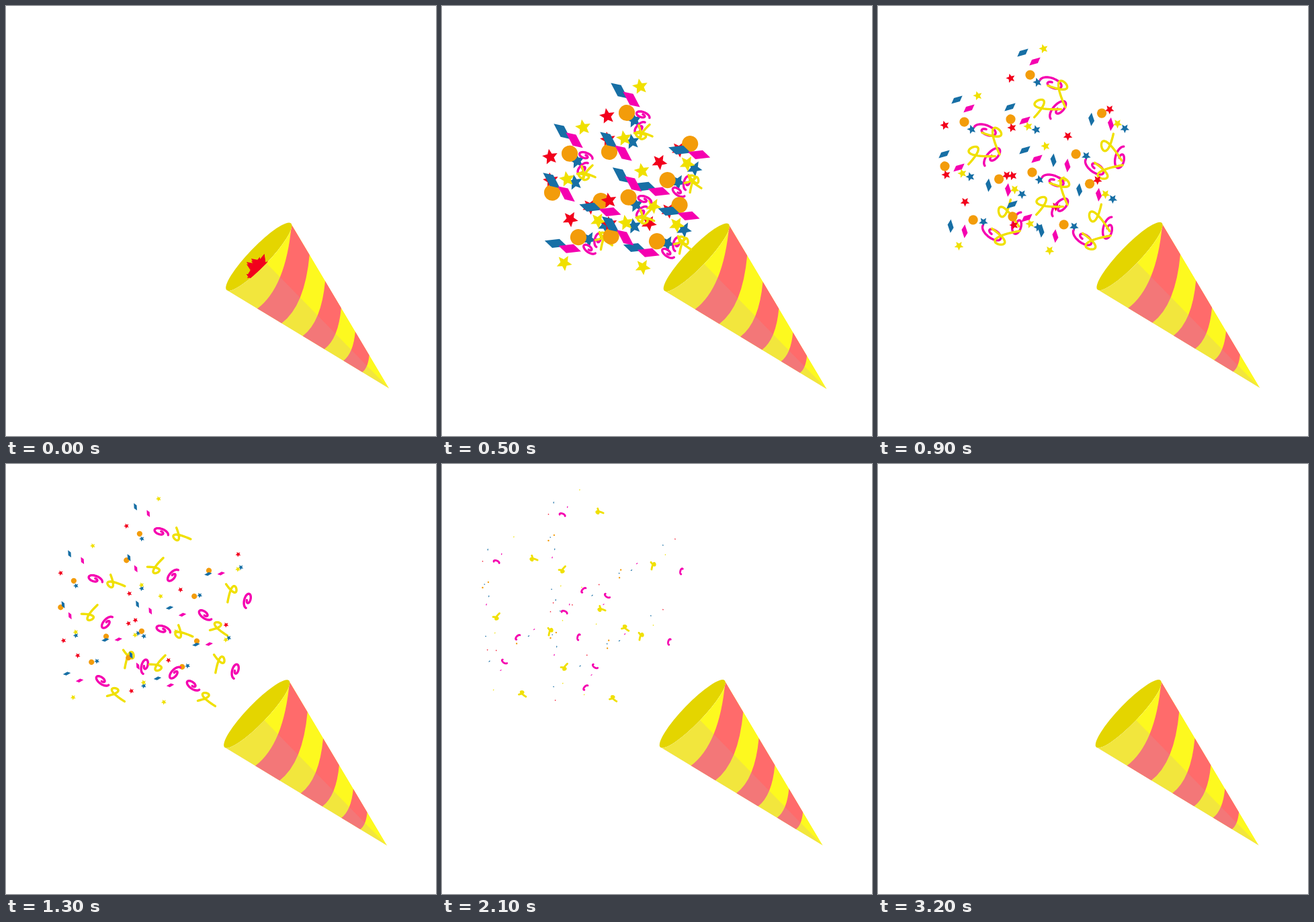
Animation of 640x640 px, one loop 3600 ms. Source, as an HTML page with a canvas:

```html
<!DOCTYPE html>
<html lang="en">
<head>
<meta charset="utf-8">
<title>Party popper</title>
<style>
html, body { margin: 0; width: 100%; height: 100%; overflow: hidden; background: #fff; }
canvas { display: block; width: 640px; height: 640px; }
</style>
</head>
<body>
<canvas id="stage" width="640" height="640"></canvas>
<script>
const ctx = document.getElementById('stage').getContext('2d');
const LOOP = 3600, STEP = 100, LAST = 3200, FADED = 3100;
const BURST = 500, SETTLED = 900;
const RED = '#f2001c', BLUE = '#176fa5', PINK = '#f500b0', ORANGE = '#f39c0a', YELLOW = '#f0e000';
const MUZZLE = [393, 408];
const RAD = Math.PI / 180;

const mix = (a, b, k) => a + (b - a) * k;
const clamp = v => Math.max(0, Math.min(1, v));
function track(t, times, vals) {
  const i = Math.max(1, times.findIndex(v => t <= v));
  if (t >= times[times.length - 1]) return vals[vals.length - 1];
  return mix(vals[i - 1], vals[i], (t - times[i - 1]) / (times[i] - times[i - 1]));
}

// Shot straight out of the cone, braked by the air, then drifting on.
const slowing = s => 1.934 * (1 - Math.exp(-s / 1100));
const steady = s => s / 800;
function place(p, t, ease, lead = 0) {
  const late = Math.max(t, BURST);
  const brake = Math.exp((BURST - late) / 85);
  const drift = ease(Math.max(0, late - SETTLED));
  const out = clamp(mix(lead, 1, t / BURST));
  return [0, 1].map(i => mix(MUZZLE[i], p.at[i] + p.kick[i] * brake + p.drift[i] * drift, out));
}

function star(r) {
  ctx.beginPath();
  for (let i = 0; i < 10; i++) {
    const a = (i * 36 - 142) * RAD, q = i % 2 ? r * 0.46 : r;
    ctx.lineTo(q * Math.cos(a), q * Math.sin(a));
  }
  ctx.fill();
}
function disc(r) {
  ctx.beginPath();
  ctx.arc(0, 0, r, 0, 2 * Math.PI);
  ctx.fill();
}
function diamond(r) {
  ctx.beginPath();
  ctx.moveTo(-1.42 * r, 0);
  ctx.lineTo(-0.3 * r, -0.64 * r);
  ctx.lineTo(1.42 * r, 0);
  ctx.lineTo(0.3 * r, 0.64 * r);
  ctx.fill();
}

function curve(from, to, point) {
  ctx.beginPath();
  for (let i = 0; i <= 40; i++) ctx.lineTo(...point(mix(from, to, i / 40)));
  ctx.stroke();
}
const flip = t => Math.cos(Math.PI * (t - SETTLED) / 400);
function curl(t, size) {
  const turns = 1.2 - 0.65 * clamp((t - 1300) / 400), w = flip(t);
  ctx.rotate(20 * RAD);
  curve(0, turns, u => {
    const r = 1.5 * size * (1 - 0.62 * u), a = 2 * Math.PI * u;
    return [w * (0.2 * size - r * Math.cos(a)), -r * 0.5 * Math.sin(a)];
  });
}
function loop(t, size) {
  const w = -1.5 * flip(t);
  ctx.rotate((45 + 0.45 * (t - SETTLED)) * RAD);
  curve(-1.4, 1.27, u => [w * size * (u ** 3 - u), size * (u * u - 1)]);
}

const bit = (draw, color, at, drift) => ({ draw, color, at, drift });
const swarm = (kick, ...bits) => bits.map(b => ({ ...b, kick }));
const bits = [
  ...swarm([48, 18],
    bit(star, RED, [199, 181], [-26, 20]),
    bit(star, BLUE, [235, 184], [-56, 2]),
    bit(star, YELLOW, [223, 179], [-36, 2])),
  ...swarm([49, 57],
    bit(star, RED, [197, 107], [-30, -25]),
    bit(star, BLUE, [237, 113], [-59, -3]),
    bit(star, YELLOW, [246, 63], [-32, -19]),
    bit(disc, ORANGE, [226, 102], [-46, 3]),
    bit(diamond, BLUE, [215, 69], [-38, -9]),
    bit(diamond, PINK, [233, 82], [-36, -14])),
  ...swarm([52, 49],
    bit(disc, ORANGE, [197, 168], [-30, -42]),
    bit(diamond, BLUE, [196, 150], [-22, -18]),
    bit(diamond, PINK, [218, 170], [-42, -24]))
];
const ribbons = [
  { draw: curl, color: PINK, turn: 0, at: [257, 115], kick: [42, 48], drift: [-52, -26] },
  { draw: curl, color: PINK, turn: -68, at: [268, 155], kick: [27, 26], drift: [-38, 22] },
  { draw: loop, color: YELLOW, turn: 0, at: [269, 123], kick: [27, 65], drift: [-24, -35] },
  { draw: loop, color: YELLOW, turn: -68, at: [243, 152], kick: [54, 38], drift: [-43, 4] }
];

function burst(t) {
  const r = Math.min(18, 23.5 * Math.exp(-t / 800) - 0.5);
  for (const b of r > 0 ? bits : []) {
    ctx.save();
    ctx.translate(...place(b, t, slowing, b.color === RED ? 0.09 : 0));
    ctx.rotate((42 - 0.195 * (t - BURST)) * RAD);
    ctx.fillStyle = b.color;
    b.draw(r);
    ctx.restore();
  }
  if (t >= FADED) return;
  const size = track(t, [0, SETTLED, 1300, 1700, 2500, FADED], [2, 13, 8.5, 5.8, 1, 0]);
  ctx.lineWidth = 3.4 * clamp((FADED - t) / 1200);
  ctx.lineCap = ctx.lineJoin = 'round';
  for (const b of ribbons) {
    ctx.save();
    ctx.translate(...place(b, t, steady));
    ctx.rotate(b.turn * RAD);
    ctx.strokeStyle = b.color;
    b.draw(t, size);
    ctx.restore();
  }
}

// Six copies of one burst: three mirrored about a 28 degree line, three as they are.
function confetti(t) {
  const e = track(t, [0, BURST, 577], [0.07, 0.867, 1]);
  const c = Math.cos(56 * RAD), s = Math.sin(56 * RAD);
  const copy = (...m) => {
    ctx.save();
    ctx.transform(...m);
    burst(t);
    ctx.restore();
  };
  for (const [x, y] of [[0, 0], [-18, 105], [-153, 98]]) {
    copy(c, s, s, -c, 83 - 248 * (1 - e) + x * e, 90 + 226 * (1 - e) + y * e);
  }
  for (const [x, y] of [[0, 0], [-98, 70], [3, 145]]) copy(1, 0, 0, 1, x * e, y * e);
}

const TIP = [567, 568], RIGHT = [421.5, 324], LEFT = [325, 421.5], BULGE = [413, 417];
const mouth = (from, to, back) => ctx.ellipse(372.8, 371.8, 69, 14.8, -46 * RAD, from, to, back);
const front = () => { mouth(Math.PI, 0, true); ctx.lineTo(...TIP); };
function fill(color, path) {
  ctx.fillStyle = color;
  ctx.beginPath();
  path();
  ctx.closePath();
  ctx.fill();
}

// Every stripe edge is the same curve, shrunk towards the tip.
function stripe(from, to) {
  const near = (p, f) => p.map((v, i) => mix(v, TIP[i], f));
  const heel = near(LEFT, 0.188);
  fill('#ff6b6b', () => {
    ctx.moveTo(...near(RIGHT, from));
    ctx.quadraticCurveTo(...near(BULGE, from), ...near(heel, from));
    ctx.lineTo(...near(heel, to));
    ctx.quadraticCurveTo(...near(BULGE, to), ...near(RIGHT, to));
  });
}

function cone() {
  ctx.beginPath();
  front();
  ctx.clip();
  fill('#fdf91f', front);
  stripe(0, 0.184);
  stripe(0.344, 0.508);
  stripe(0.652, 0.795);
  fill('rgba(201,160,164,0.224)', () => {
    ctx.moveTo(373, 370);
    ctx.lineTo(...TIP);
    ctx.lineTo(320, 560);
    ctx.lineTo(300, 400);
  });
}

function render(t) {
  ctx.fillStyle = '#fff';
  ctx.fillRect(0, 0, 640, 640);
  const kick = t < 200 ? 3.5 + 0.059 * t : 15.3 * Math.exp((200 - t) / 320);
  const recoil = paint => {
    ctx.save();
    ctx.translate(kick, kick * 0.4);
    paint();
    ctx.restore();
  };
  recoil(() => fill('#e4d500', () => mouth(0, 2 * Math.PI)));
  if (t < LAST) confetti(t);
  recoil(cone);
}

const start = performance.now();
function tick() {
  const ms = (performance.now() - start) % LOOP;
  render(Math.min(LAST, Math.floor(ms / STEP) * STEP));
  requestAnimationFrame(tick);
}
tick();
</script>
</body>
</html>
```
